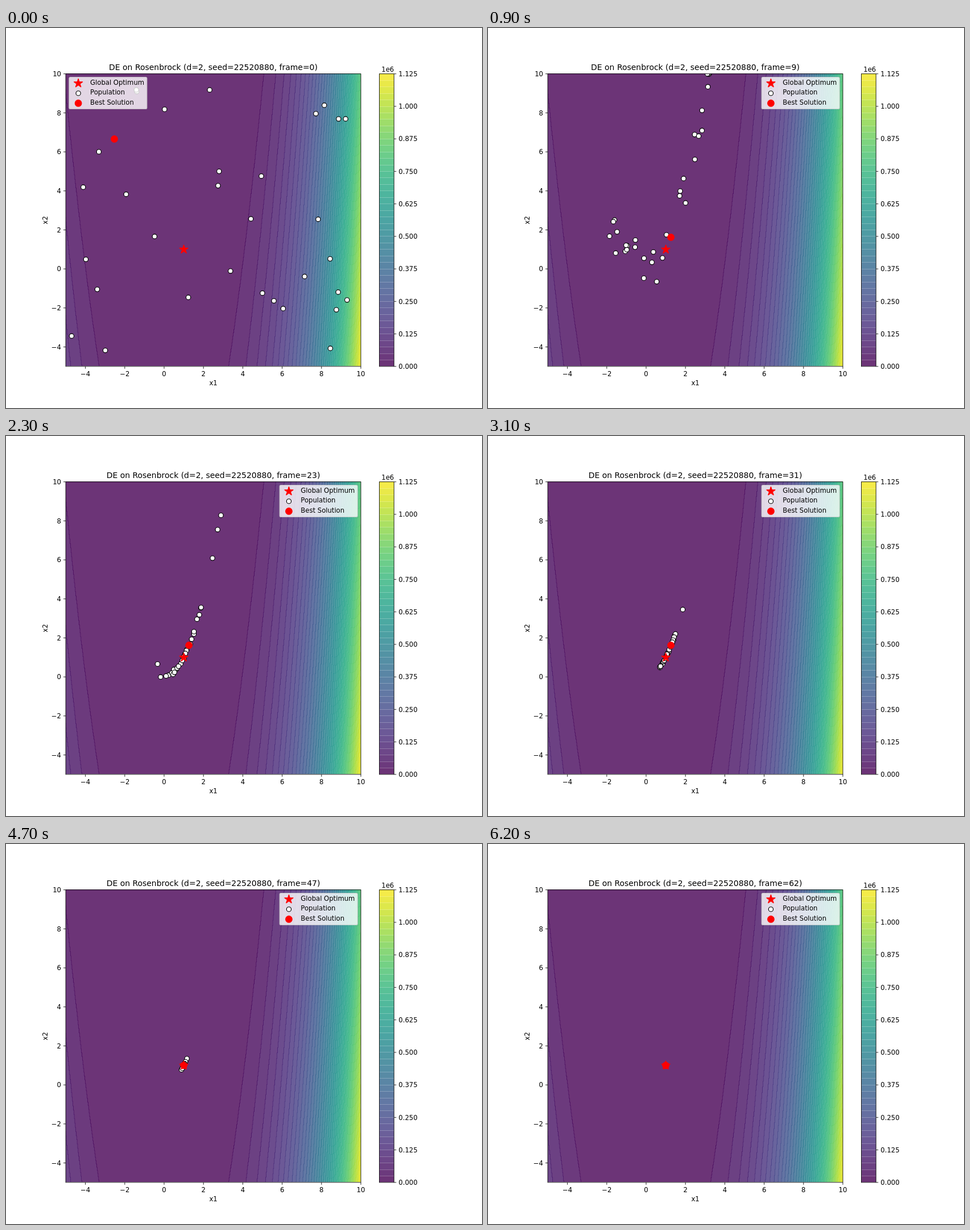
An HTML page with a canvas that plays this animation: 837x669 px, repeating every 6.3 s.

```html
<!DOCTYPE html>
<html lang="en">
<head>
<meta charset="utf-8">
<title>Differential evolution</title>
<style>
html, body { margin: 0; width: 100%; height: 100%; overflow: hidden; background: #fff; }
canvas { display: block; }
</style>
</head>
<body>
<canvas id="stage" width="837" height="669"></canvas>
<script>
const ctx = document.getElementById('stage').getContext('2d');

// The figure is laid out on 1000 x 800 units and scaled to the stage.
const SX = 837 / 1000, SY = 669 / 800;
const STEP = 100, STEPS = 63, BANDS = 45, MEMBERS = 32;
const PT = 100 / 72, FONT = 10 * PT;
const axes = { x: 125, y: 96, w: 620, h: 616 };
const bar = { x: 783.75, y: 96, w: 30.8, h: 616 };
const px = v => axes.x + (v + 5) * axes.w / 15;
const py = v => axes.y + (10 - v) * axes.h / 15;
const clamp = (v, lo, hi) => Math.min(hi, Math.max(lo, v));

// Polynomial fit of the viridis colour map, constant term first.
const VIRIDIS = [
  [0.27773, 0.10509, -0.33086, -4.63423, 6.22827, 4.77638, -5.43546],
  [0.00541, 1.40461, 0.21485, -5.7991, 14.17993, -13.74515, 4.64585],
  [0.3341, 1.38459, 0.0951, -19.33244, 56.69055, -65.35303, 26.31244]
];
const viridis = t => VIRIDIS.map(c => 255 * clamp(c.reduceRight((sum, k) => sum * t + k, 0), 0, 1));
const palette = Array.from({ length: BANDS }, (_, i) => viridis(i / BANDS));
const over = (top, under) => top.map((c, i) => c * 0.8 + under[i] * 0.2);
const WHITE = [255, 255, 255];

// Pixels on a band border are painted by both bands, which gives the dark lines.
function makeField() {
  const field = document.createElement('canvas');
  field.width = axes.w;
  field.height = axes.h;
  const fctx = field.getContext('2d');
  const img = fctx.createImageData(axes.w, axes.h);
  const band = u => u < 0 ? 0 : Math.min(BANDS - 1, Math.floor(u * u / 250));
  for (let j = 0; j < axes.h; j++) {
    const top = 10 - j * 15 / axes.h, bottom = top - 15 / axes.h;
    for (let i = 0; i < axes.w; i++) {
      const a = (-5 + i * 15 / axes.w) ** 2, b = (-5 + (i + 1) * 15 / axes.w) ** 2;
      const last = band(Math.max(a, b) - bottom);
      let color = WHITE;
      for (let k = band(Math.min(a, b) - top); k <= last; k++) color = over(palette[k], color);
      img.data.set([...color, 255], (j * axes.w + i) * 4);
    }
  }
  fctx.putImageData(img, 0, 0);
  return field;
}
const field = makeField();

function randomizer(seed) {
  return () => {
    seed = (seed + 0x6D2B79F5) | 0;
    let t = Math.imul(seed ^ (seed >>> 15), 1 | seed);
    t = (t + Math.imul(t ^ (t >>> 7), 61 | t)) ^ t;
    return ((t ^ (t >>> 14)) >>> 0) / 2 ** 32;
  };
}

const cost = ([x, y]) => 100 * (y - x * x) ** 2 + (1 - x) ** 2;

// Greedy search: trials gather on the valley y = x^2, then close in on (1, 1).
function evolve() {
  const rand = randomizer(22520880), signed = () => 2 * rand() - 1;
  let pop = Array.from({ length: MEMBERS }, () => [15 * rand() - 5, 15 * rand() - 5]);
  const history = [pop];
  for (let n = 1; n < STEPS; n++) {
    const spread = 3.5 * Math.max(0, 1 - n / 55) ** 1.7;
    const scatter = spread ? 6 * Math.exp(-n / 6) : 0;
    pop = pop.map(member => {
      const x = 1 + spread * signed();
      const trial = [x, clamp(x * x + scatter * signed(), -5, 10)];
      return rand() < 0.5 && cost(trial) < cost(member) ? trial : member;
    });
    history.push(pop);
  }
  return history;
}
const history = evolve();

// Best solution: first step, x1, x2.
const bests = [[0, -2.53, 6.66], [3, -0.1, 0], [9, 1.26, 1.62], [38, 1.05, 1.1], [44, 1, 1]];

function text(str, x, y, align = 'center', size = FONT) {
  ctx.font = `${size}px "DejaVu Sans", sans-serif`;
  ctx.textAlign = align;
  ctx.fillStyle = '#000';
  ctx.fillText(str, x, y);
}

function line(x1, y1, x2, y2) {
  ctx.beginPath();
  ctx.moveTo(x1, y1);
  ctx.lineTo(x2, y2);
  ctx.stroke();
}

function paint(fill, edge) {
  ctx.lineWidth = PT;
  ctx.fillStyle = fill;
  ctx.strokeStyle = edge;
  ctx.fill();
  ctx.stroke();
}

function disc(x, y, area, fill, edge) {
  ctx.beginPath();
  ctx.arc(x, y, Math.sqrt(area) * PT / 2, 0, 2 * Math.PI);
  paint(fill, edge);
}
const member = (x, y) => disc(x, y, 50, '#fff', '#000');
const best = (x, y) => disc(x, y, 100, '#f00', '#f00');

function star(x, y) {
  const r = Math.sqrt(200) * PT / 2;
  ctx.beginPath();
  for (let i = 0; i < 10; i++) {
    const d = i % 2 ? r * 0.381966 : r, a = i * Math.PI / 5;
    ctx.lineTo(x + d * Math.sin(a), y - d * Math.cos(a));
  }
  ctx.closePath();
  ctx.lineJoin = 'bevel';
  paint('#f00', '#f00');
  ctx.lineJoin = 'miter';
}

function frameBox(b) {
  ctx.lineWidth = 1;
  ctx.strokeStyle = '#000';
  ctx.strokeRect(b.x, b.y, b.w, b.h);
}

function drawAxes() {
  const tick = 3.5 * PT, pad = 7 * PT, bottom = axes.y + axes.h;
  const label = v => String(v).replace('-', '\u2212');
  frameBox(axes);
  for (let v = -4; v <= 10; v += 2) {
    line(px(v), bottom, px(v), bottom + tick);
    text(label(v), px(v), bottom + pad + 10.6);
    line(axes.x - tick, py(v), axes.x, py(v));
    text(label(v), axes.x - pad, py(v) + 5.1, 'right');
  }
  text('x1', axes.x + axes.w / 2, 752);
  ctx.save();
  ctx.translate(86.3, axes.y + axes.h / 2);
  ctx.rotate(-Math.PI / 2);
  text('x2', 0, 0);
  ctx.restore();
}

function drawBar() {
  const right = bar.x + bar.w, edge = k => bar.y + bar.h * (1 - k / BANDS);
  palette.forEach((c, k) => {
    const y = Math.round(edge(k + 1) * SY) / SY, next = Math.round(edge(k) * SY) / SY;
    ctx.fillStyle = `rgb(${over(c, WHITE).map(Math.round)})`;
    ctx.fillRect(bar.x, y, bar.w, next - y);
  });
  frameBox(bar);
  for (let k = 0; k <= BANDS; k += 5) {
    line(right, edge(k), right + 3.5 * PT, edge(k));
    text((k / 40).toFixed(3), right + 7 * PT, edge(k) + 5.1, 'left');
  }
  text('1e6', right, bar.y - 3 * PT, 'right');
}

function drawLegend(atLeft) {
  const w = 163.7, h = 67, gap = FONT / 2, row = 20.94;
  const x = atLeft ? axes.x + gap : axes.x + axes.w - gap - w, y = axes.y + gap;
  ctx.beginPath();
  ctx.roundRect(x, y, w, h, 2.8);
  ctx.fillStyle = 'rgba(255,255,255,0.8)';
  ctx.fill();
  ctx.lineWidth = PT;
  ctx.strokeStyle = 'rgba(204,204,204,0.8)';
  ctx.stroke();
  [['Global Optimum', star], ['Population', member], ['Best Solution', best]].forEach(([name, mark], i) => {
    const base = y + 16 + i * row;
    mark(x + 19.45, base - 3);
    text(name, x + 44.45, base, 'left');
  });
}

function draw(n) {
  const [, bx, by] = bests.findLast(b => b[0] <= n);

  ctx.setTransform(1, 0, 0, 1, 0, 0);
  ctx.fillStyle = '#fff';
  ctx.fillRect(0, 0, 837, 669);
  ctx.setTransform(SX, 0, 0, SY, 0, 0);
  ctx.imageSmoothingQuality = 'high';
  ctx.drawImage(field, axes.x, axes.y);

  // Everything drawn on top sits on pixel centres.
  ctx.translate(0.5, 0.5);
  ctx.save();
  ctx.beginPath();
  ctx.rect(axes.x, axes.y, axes.w, axes.h);
  ctx.clip();
  history[n].forEach(([x, y]) => member(px(x), py(y)));
  best(px(bx), py(by));
  star(px(1), py(1));
  ctx.restore();

  drawAxes();
  drawBar();
  drawLegend(n === 0);
  text(`DE on Rosenbrock (d=2, seed=22520880, frame=${n})`,
    axes.x + axes.w / 2, axes.y - 5.6 * PT, 'center', 12 * PT);
}

let shown = -1;
function tick() {
  const n = Math.floor(performance.now() / STEP) % STEPS;
  if (n !== shown) draw(shown = n);
  requestAnimationFrame(tick);
}
tick();
</script>
</body>
</html>
```
